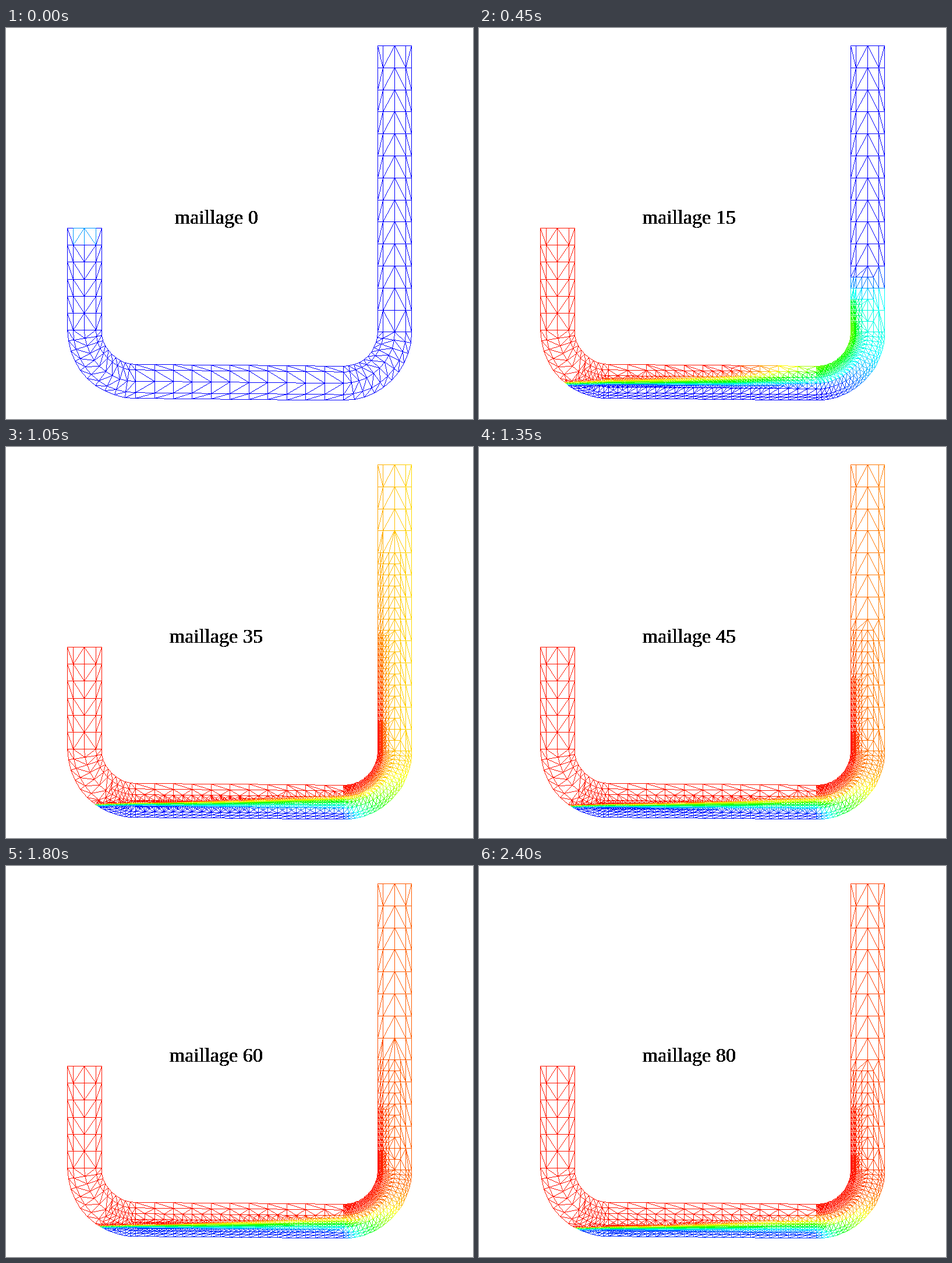
A matplotlib script for the animation above (2.55 s loop, 802 by 671 pixels).

```python
import numpy as np
import matplotlib.pyplot as plt
from matplotlib.animation import FuncAnimation

W, H, DPI = 802, 671, 100
FRAMES, STEP = 17, 150
SUB = 16          # lattice units per coarse cell
BORE = 58.5       # pipe width; inner bend radius has the same size

# Arc length along the pipe: left leg, bend, bottom, bend, right leg
LEG, BEND, FLOOR, RISE = 175, 139, 357.1, 491.4
S1 = LEG
S2 = S1 + BEND
S3 = S2 + FLOOR
S4 = S3 + BEND
S5 = S4 + RISE
CELLS = (6, 10, 11, 10, 13)
stations = np.concatenate(
    [np.linspace(a, b, n, endpoint=False)
     for a, b, n in zip((0, S1, S2, S3, S4), (S1, S2, S3, S4, S5), CELLS)] + [[S5]])
layers = np.array([0, 1 / 6, 0.5, 5 / 6, 1])


def place(s, w):
    """Map arc length and wall distance (0 inner, 1 outer) to pixels."""
    r = BORE * (1 + w)
    left = np.clip((s - S1) / BEND, 0, 1) * np.pi / 2
    right = np.clip((s - S3) / BEND, 0, 1) * np.pi / 2
    q = np.clip((s - S2) / FLOOR, 0, 1)
    cx, cy = 222.6 + FLOOR * q, 518.6 + 3.3 * q
    first = s < S3
    x = cx + np.where(first, -r * np.cos(left), r * np.sin(right))
    y = cy + np.where(first, r * np.sin(left), r * np.cos(right))
    y = y - np.clip(S1 - s, 0, None) - np.clip(s - S4, 0, None)
    return x, y


def at(n, times, values):
    return np.interp(n, times, values)


def layering(n, s, w):
    """Stratified concentration across the bottom of the pipe."""
    key = (3, 5, 9, 16)
    q = np.clip((s - S2) / FLOOR, 0, 1) ** 1.4
    z0 = at(n, key, (32, 33, 38, 44)) * (1 - q) + at(n, key, (24, 24, 31, 36)) * q
    z0 = z0 + 4 * np.clip((S2 - s) / BEND, 0, 1)
    thin = at(n, key, (10, 4, 4, 4)) * np.clip((s - S1) / BEND, 0.3, 1)
    above = thin + (at(n, key, (28, 12, 18, 24)) - thin) * q
    below = 5 + (at(n, key, (18, 30, 20, 18)) - 5) * q
    z = np.where(s < S2, place(s, w)[1] - 577, BORE * w)
    v = (z - z0) / np.where(z < z0, above, below)
    return 0.5 - 0.5 * np.sin(np.clip(v, -1, 1) * np.pi / 2)


def riser(n, s, w):
    """Concentration in the right leg, with a plume along the inner wall."""
    level = at(n, (2, 3, 4, 5, 6, 7, 9, 12, 16),
               (0, 0.28, 0.45, 0.66, 0.75, 0.83, 0.905, 0.93, 0.96))
    up = np.clip(s - S4, 0, None)
    reach = at(n, (3, 5, 7, 16), (60, 130, 170, 120))
    plume = np.exp(-(w / 0.24) ** 2 - (up / reach) ** 2)
    swing = at(n, (3, 5, 7, 10), (0, 0.14, 0.05, 0.01))
    top = at(n, (3, 4, 5, 6), (0, 0.2, 0.3, 0)) * np.clip((up - 410) / 80, 0, 1)
    c = level + swing * (0.4 - w) - top * (1 - w)
    peak = 0.62 if n < 4 else 1
    return c + np.clip(peak - c, 0, 1) * plume


def field(n, s, w):
    if n == 0:
        return np.where((s < 16) & (w > 0.1) & (w < 0.9), 0.15, 0.0)
    front = at(n, (1, 2, 3, 4, 5), (255, 590, 921, 1400, 4000))
    blur = at(n, (1, 2, 3, 4), (200, 300, 390, 700))
    c = layering(n, s, w) * np.clip((front - s) / blur, 0, 1)
    theta = np.clip((s - S3) / BEND, 0, 1) * np.pi / 2
    u = np.sin(theta) ** at(n, (3, 5), (2, 0.8))
    edge = at(n, (3, 4), (60, 250))
    c = (1 - u) * c + u * riser(n, s, w) * np.clip((front - s) / edge, 0, 1)
    base = at(n, (3, 16), (0, 0.05))
    peak = at(n, (1, 2, 3), (0.9, 0.96, 0.98))
    return base + (peak - base) * np.clip(c, 0, 1)


def coarse():
    tris = []
    flipped = {0, CELLS[0] - 1, sum(CELLS[:4])}
    last = len(stations) - 2
    for i in range(last + 1):
        for j in range(4):
            inward = j < 2
            if (i in flipped and j in (1, 2)) or (i == last and j in (0, 3)):
                inward = not inward
            a, b, c, d = (i, j), (i + 1, j), (i + 1, j + 1), (i, j + 1)
            tris += [(a, b, c), (a, c, d)] if inward else [(a, b, d), (b, c, d)]
    return np.array(tris) * SUB


def param(p):
    s = np.interp(p[..., 0] / SUB, np.arange(len(stations)), stations)
    w = np.interp(p[..., 1] / SUB, np.arange(5), layers)
    return s, w


def wanted(n, level, tris):
    """Tell which edges must be halved; depends on the edge alone."""
    ends = np.roll(tris, -1, axis=1)
    sa, wa = param(tris)
    sb, wb = param(ends)
    s, w = (sa + sb) / 2, (wa + wb) / 2
    size = np.hypot(sa - sb, (wa - wb) * BORE)
    h = 0.55 * size
    probes = [field(n, s, w)]
    for sign in (-1, 1):
        probes.append(field(n, np.clip(s + sign * h, 0, S5), w))
        probes.append(field(n, s, np.clip(w + sign * h / BORE, 0, 1)))
    mark = (np.ptp(probes, axis=0) > 0.26) & (size > 4)
    if n >= 3:
        up = s - S4
        tall = at(n, (3, 4, 5, 6, 7, 9, 12, 16),
                  (113, 491, 491, 440, 345, 215, 190, 185))
        leg, bend = up > 0, (s > S3) & (up <= 0)
        flat = (s > S2 - 50) & (s <= S3)
        if level == 0:
            mark |= leg & (up < tall) & (w < 0.75)
            mark |= bend | (flat & (w > 0.3))
        elif level == 1:
            mark |= leg & (up < 0.58 * tall) & (w < 0.35)
            mark |= bend & (w < 0.4)
        elif level == 2:
            mark |= leg & (up < 0.15 * tall) & (w < 0.22)
    return mark


def split(tris, mark):
    count = mark.sum(axis=1)
    parts = [tris[count == 0]]

    def add(sel, *corners):
        parts.append(np.stack([p[sel] for p in corners], axis=1))

    for r in range(3):
        a, b, c = np.roll(tris, -r, axis=1).transpose(1, 0, 2)
        k = np.roll(mark, -r, axis=1)
        ab, bc, ca = (a + b) // 2, (b + c) // 2, (c + a) // 2
        one = (count == 1) & k[:, 0]
        add(one, a, ab, c)
        add(one, ab, b, c)
        two = (count == 2) & ~k[:, 2]
        add(two, ab, b, bc)
        add(two, a, ab, bc)
        add(two, a, bc, c)
        full = count == 3
        add(full, a, ab, ca)
        if r == 0:
            add(full, ab, bc, ca)
    return np.concatenate(parts)


def edges(tris):
    a, b = tris.reshape(-1, 2), np.roll(tris, -1, axis=1).reshape(-1, 2)
    swap = (a[:, 0] > b[:, 0]) | ((a[:, 0] == b[:, 0]) & (a[:, 1] > b[:, 1]))
    pairs = np.where(swap[:, None], np.hstack([b, a]), np.hstack([a, b]))
    return np.unique(pairs, axis=0).reshape(-1, 2, 2)


def rainbow(c):
    hue = 4 * (1 - c)
    return np.stack([np.clip(2 - hue, 0, 1),
                     np.clip(np.minimum(hue, 4 - hue), 0, 1),
                     np.clip(hue - 2, 0, 1)], axis=1)


def stroke(x, y, colors):
    """Draw hard one-pixel lines, stepping along the longer axis."""
    px, py = np.floor(x), np.floor(y)
    dx, dy = px[:, 1] - px[:, 0], py[:, 1] - py[:, 0]
    steps = np.maximum(np.maximum(abs(dx), abs(dy)), 1).astype(int)
    line = np.repeat(np.arange(len(steps)), steps + 1)
    first = np.cumsum(steps + 1) - (steps + 1)
    t = (np.arange(len(line)) - first[line]) / steps[line]
    col = np.floor(px[line, 0] + dx[line] * t + 0.5).astype(int)
    row = np.floor(py[line, 0] + dy[line] * t + 0.5).astype(int)
    canvas = np.ones((H, W, 3))
    canvas[row, col] = colors[line]
    return canvas


GRID = coarse()

fig = plt.figure(figsize=(W / DPI, H / DPI), dpi=DPI, facecolor="white")
ax = fig.add_axes([0, 0, 1, 1])
ax.axis("off")
mesh = ax.imshow(np.ones((H, W, 3)), extent=(0, W, H, 0), aspect="auto",
                 interpolation="nearest")
# Two copies one pixel apart give the heavier lettering
labels = [ax.text(x, 336, "", family="Liberation Serif", fontsize=24.7,
                  ha="center", va="baseline", color="black", antialiased=False)
          for x in (360.5, 361.5)]


def draw(n):
    tris = GRID
    if n:
        for level in range(4):
            tris = split(tris, wanted(n, level, tris))
    lines = edges(tris)
    s, w = param(lines)
    colors = rainbow(field(n, s.mean(axis=1), w.mean(axis=1)))
    mesh.set_data(stroke(*place(s, w), colors))
    for label in labels:
        label.set_text(f"maillage {5 * n}")
    return [mesh, *labels]


anim = FuncAnimation(fig, draw, frames=FRAMES, interval=STEP, repeat=True,
                     repeat_delay=0, blit=False)
plt.show()
```
